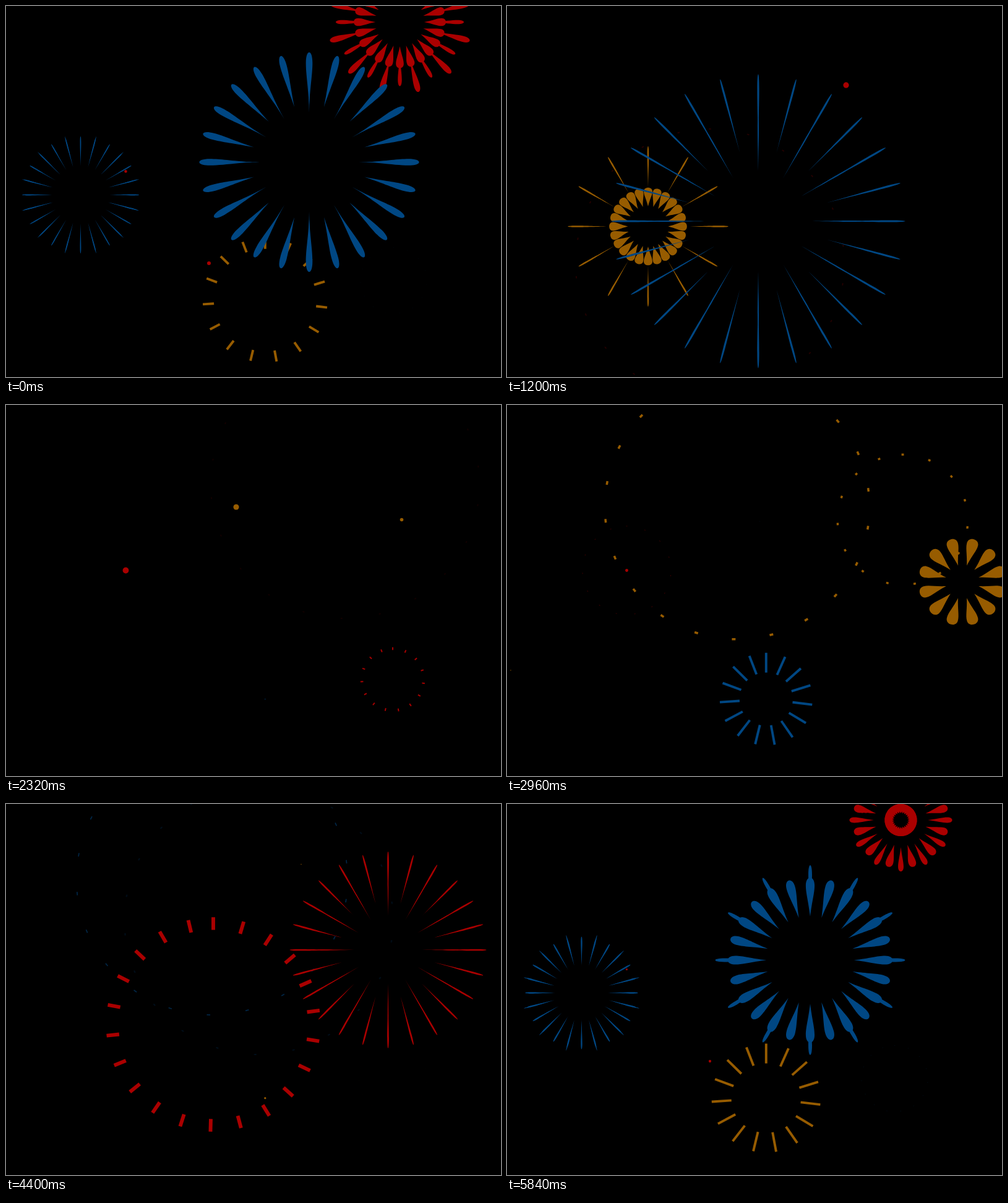
Animation, 800 px wide and 600 px high, one loop 5.92 s. Source, as an HTML page:

```html
<!DOCTYPE html>
<html lang="en">
<head>
<meta charset="utf-8">
<title>Fireworks</title>
<style>
  html, body { margin: 0; width: 100%; height: 100%; overflow: hidden; background: #000; }
  svg { display: block; width: 100%; height: 100%; }
</style>
</head>
<body>
<svg id="sky" viewBox="0 0 800 600"></svg>
<script>
const LOOP = 5920, STEP = 80, DOT = 550, LINGER = 360;
const RED = '#aa0000', BLUE = '#004783', GOLD = '#975c00';
const sky = document.getElementById('sky');
const parts = [];

const clamp = (v, a = 0, b = 1) => Math.min(b, Math.max(a, v));
const out = (u, p) => 1 - Math.pow(1 - clamp(u), p);
const mod = v => ((v % LOOP) + LOOP) % LOOP;
const f = v => v.toFixed(2);

function add(parent, tag, attrs) {
  const el = document.createElementNS('http://www.w3.org/2000/svg', tag);
  for (const k in attrs) el.setAttribute(k, attrs[k]);
  parent.appendChild(el);
  return el;
}

// A group of n equal rays around a centre
function rays(x, y, n, step, offset, attrs) {
  const g = add(sky, 'g', { transform: `translate(${x} ${y})`, ...attrs });
  const list = [];
  for (let i = 0; i < n; i++)
    list.push(add(g, 'path', { transform: `rotate(${f(offset + i * step)})` }));
  return { g, list };
}

function show(g, opacity) {
  g.setAttribute('display', opacity > 0 ? 'inline' : 'none');
  g.setAttribute('opacity', f(opacity));
}

function petalPath(inner, tip, r) {
  const len = tip - inner, belly = -(tip - len * .2), mid = -(inner + len * .6);
  const low = -(inner + len * .4), cap = -(tip - len * .07);
  return `M0 ${f(-inner)}C${f(r * .42)} ${f(low)} ${f(r)} ${f(mid)} ${f(r)} ${f(belly)}` +
    `C${f(r)} ${f(cap)} ${f(r * .55)} ${f(-tip)} 0 ${f(-tip)}` +
    `C${f(-r * .55)} ${f(-tip)} ${f(-r)} ${f(cap)} ${f(-r)} ${f(belly)}` +
    `C${f(-r)} ${f(mid)} ${f(-r * .42)} ${f(low)} 0 ${f(-inner)}Z`;
}

// Teardrop layer: shoots out, thins to a line, then retreats outwards
function petals(x, y, R, fill, D, n, offset, start, wide = 1, root = 1) {
  const { g, list } = rays(x, y, n, 360 / n, offset, { fill });
  const hold = 520 + D / 2;
  parts.push(t => {
    const s = mod(t - start);
    if (s > hold + 280) return show(g, 0);
    const u = s / D, p = clamp((s - hold) / 280);
    const tip = R * out(u, 2);
    const base = root * Math.max(0, .51 * out(u, 2.5) - .03);
    const inner = R * (base + (.99 - base) * Math.sqrt(p));
    const width = R * wide * (.009 + .085 * Math.pow(1 - clamp(u), 1.3));
    const d = petalPath(inner, tip, Math.min(width / 2, tip));
    list.forEach(el => el.setAttribute('d', d));
    show(g, Math.pow(1 - p, 4));
  });
}

const inner12 = (x, y, R, c, D, start) => petals(x, y, R * .7, c, D, 12, 0, start, 1.35);
const outer12 = (x, y, R, c, D, start, wide, root) => petals(x, y, R, c, D, 12, 15, start, wide, root);
const full24 = (x, y, R, c, D, start) => petals(x, y, R, c, D, 24, 0, start);

// Dash ring: a growing dot, then dashes flying outwards and shortening
function dashes(x, y, R, color, start) {
  const big = R > 150, D = big ? 700 : 500;
  const { g, list } = rays(x, y, big ? 22 : 15, big ? 16.5 : 24.2, 0, { stroke: color });
  const dot = add(sky, 'circle', { cx: x, cy: y, fill: color });
  parts.push(t => {
    const s = mod(t - start + DOT) - DOT;
    dot.setAttribute('r', s < 0 ? f((big ? 6 : 5) * (1 + s / DOT)) : 0);
    if (s < 0 || s > D + LINGER) return show(g, 0);
    const k = out(s / D, 3), p = clamp((s - D) / LINGER), left = 1 - k;
    const len = big ? Math.min(.175, .41 * left + .008) : Math.min(.295, 2.2 * left + .012);
    const tip = R * k, inner = Math.max(0, tip - R * len);
    list.forEach(el => el.setAttribute('d', `M0 ${f(-inner)}V${f(-tip)}`));
    g.setAttribute('stroke-width', f(R * (big ? .027 : .036) * (1 - p * .6)));
    show(g, p > 0 ? .6 * (1 - p) : 1);
  });
}

inner12(228, 356.5, 188, GOLD, 1000, 320);
full24(228, 356.5, 188, GOLD, 1000, 1016);

inner12(120.5, 305.5, 98, BLUE, 1000, 4800);
outer12(120.5, 305.5, 98, BLUE, 1000, 4963);
full24(120.5, 305.5, 98, BLUE, 1000, 5105);

[
  [418.8, 475.7, 108.5, GOLD, 5626], [418.8, 475.7, 108.5, BLUE, 2798],
  [418.8, 475.7, 108.5, GOLD, 4767],
  [193.5, 267.5, 72, RED, 303], [193.5, 267.5, 72, RED, 2330], [193.5, 267.5, 72, RED, 3240],
  [625, 444, 54, RED, 1980], [625, 444, 55, GOLD, 3564], [626.5, 444, 54, BLUE, 5130],
  [477, 97.5, 55, GOLD, 4880], [639.5, 185.5, 108, GOLD, 2564], [6, 429, 53, GOLD, 3440],
  [328, 416, 218, RED, 275], [548, 128, 218, RED, 1325], [372, 165, 220, GOLD, 2450],
  [408.5, 188, 218, BLUE, 3485], [333, 122, 220, BLUE, 3662], [335, 356.5, 219, RED, 4115]
].forEach(a => dashes(...a));

outer12(736, 286, 158, GOLD, 510, 2828, 1.75, .72);

inner12(617.5, 236, 163, RED, 510, 3838);
full24(617.5, 236, 163, RED, 510, 3970);

inner12(636.5, 26, 182, RED, 510, -289);
outer12(636.5, 26, 182, RED, 510, -205);
full24(636.5, 26, 182, RED, 510, -118);

inner12(406, 348, 240, BLUE, 510, 636);
full24(406, 348, 240, BLUE, 510, 740);

inner12(490, 252.5, 240, BLUE, 510, -440);
full24(490, 252.5, 240, BLUE, 510, -250);

const begin = performance.now();
function draw(now) {
  const t = Math.floor(Math.max(0, now - begin) % LOOP / STEP) * STEP;
  parts.forEach(part => part(t));
  requestAnimationFrame(draw);
}
draw(begin);
</script>
</body>
</html>
```
